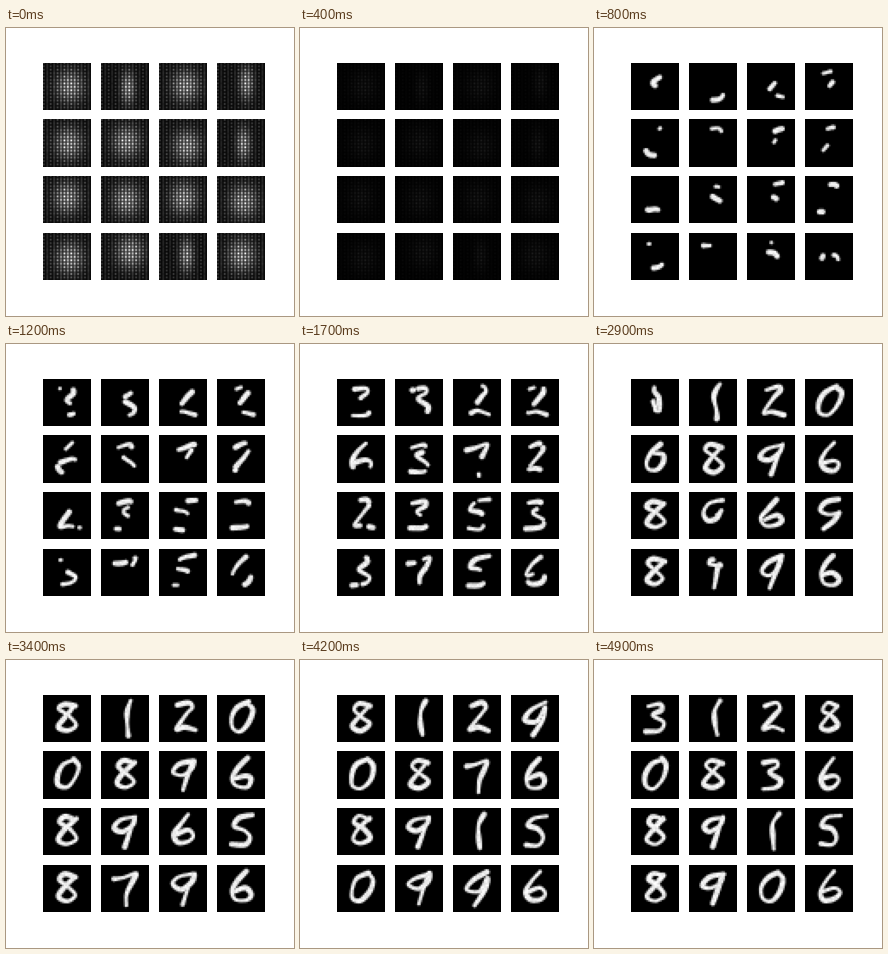
A matplotlib script that plays this animation: 288 px wide and 288 px high, repeating every 5100 ms.

```python
import numpy as np
import matplotlib.pyplot as plt
from matplotlib.animation import FuncAnimation

SIZE, SAMPLES, LAST = 28, 72, 49
Y, X = np.mgrid[:SIZE, :SIZE] + 0.5
TRAIL = np.linspace(0, 1, SAMPLES)

# One pen stroke per digit, as a few points on the 28 x 28 grid
DIGITS = [
    [(18, 5), (12, 8), (8.5, 14), (9, 20), (14, 21.5), (19, 16), (21, 9), (18, 5)],
    [(18, 4), (15, 10), (15, 17), (16, 24)],
    [(11, 6.5), (17, 5), (19, 8), (16, 12), (10, 20), (15, 19.5), (21, 21)],
    [(10, 7), (17, 6), (18, 9), (13, 12.5), (19, 17), (17, 21), (9, 22)],
    [(20, 4.5), (12, 9), (8, 15), (15, 16), (20, 8), (18, 15), (13, 24)],
    [(21, 5), (13, 6.5), (10, 11), (16, 13), (19, 18), (16, 22), (9, 22)],
    [(17, 4.5), (12, 10), (9, 16), (11, 21), (17, 21), (20, 17), (17, 14), (10, 16)],
    [(8, 9), (13, 8), (20, 5.5), (18, 11), (15, 17), (15, 24)],
    [(19, 7), (13, 5.5), (10, 9), (15, 13), (19, 18), (14, 21.5), (9, 19), (13, 13), (19, 7)],
    [(20, 6), (12, 7.5), (8, 12), (13, 14), (19, 10), (20, 6), (17, 14), (14, 23)],
]

# Digits the sixteen cells resemble, by frame
STAGES = {
    0: "3322637223533756",
    17: "3322637223533756",
    24: "3120689680698946",
    34: "8120089689658796",
    42: "8124087689150946",
    49: "3128083689158906",
}
KEYS = list(STAGES)
NARROW_GLOW = {1, 3, 7, 14}


def smoothstep(t):
    t = np.clip(t, 0, 1)
    return t * t * (3 - 2 * t)


def curve(points):
    """Catmull-Rom curve through the points, evenly sampled."""
    p = np.vstack([points[0], points, points[-1]])
    place = TRAIL * (len(points) - 1)
    i = np.minimum(place.astype(int), len(points) - 2)
    u = (place - i)[:, None]
    a, b, c, d = p[i], p[i + 1], p[i + 2], p[i + 3]
    return b + u * (c - a + u * (2 * a - 5 * b + 4 * c - d + u * (3 * (b - c) + d - a))) / 2


def handwriting(cell, key):
    """The cell's digit at a key frame, a little different each time."""
    rng = np.random.default_rng(100 * key + cell)
    points = np.array(DIGITS[int(STAGES[key][cell])], float)
    return curve(points + rng.normal(0, 0.3, points.shape))


def pen_path(cell, frame, rng):
    after = next(k for k in KEYS[1:] if k >= frame)
    before = KEYS[KEYS.index(after) - 1]
    t = (frame - before) / (after - before)
    path = handwriting(cell, before)
    path = path + smoothstep(t) * (handwriting(cell, after) - path)
    phase = rng.uniform(0, 2 * np.pi, 2)
    sway = np.sin(2 * np.pi * TRAIL[:, None] + phase)
    return path + 0.6 * np.sin(np.pi * t) * sway


def strongest(path, cell, frame):
    """The part of a stroke already formed; level runs come first."""
    phase = np.random.default_rng(cell).uniform(0, 2 * np.pi, 3)
    noise = sum(np.sin((4 + 5 * n) * TRAIL + phase[n] + 0.2 * frame) for n in range(3))
    slope = np.gradient(path, axis=0)
    level = np.abs(slope[:, 0]) / (np.hypot(*slope.T) + 1e-6)
    order = np.argsort(np.argsort(-(noise + 1.5 * level)))
    return order < SAMPLES * np.clip((frame - 5) / 17, 0, 1)


def digit_image(cell, frame):
    rng = np.random.default_rng(1000 * frame + cell)
    path = pen_path(cell, frame, rng)
    width = 1.85 + 0.3 * np.sin(9 * TRAIL + rng.uniform(0, 6))
    distance = np.hypot(X - path[:, 0, None, None], Y - path[:, 1, None, None])
    mark = np.clip(width[:, None, None] - distance, 0, 1)
    mark *= strongest(path, cell, frame)[:, None, None]
    return mark.max(axis=0) * rng.uniform(0.88, 1, X.shape)


def woven_image(cell):
    """Fine woven dots brightened around a soft centre."""
    rng = np.random.default_rng(cell)
    cx, cy = rng.normal((15.5, 14.5), 0.8)
    spread = 2.8 if cell in NARROW_GLOW else 5.5
    col, row = X.astype(int), Y.astype(int)
    dots = (0.55 + 0.45 * (-1.0) ** col) * (0.6 + 0.4 * (-1.0) ** row)
    dots *= 0.85 + 0.15 * np.cos(np.pi * (col + row) / 2)
    glow = np.exp(-((X - cx) / spread) ** 2 / 2 - ((Y - cy) / 6.5) ** 2 / 2)
    slant = 0.1 * ((col + 2 * row) % 4 == 0)
    return np.clip(0.03 + slant + 0.12 * dots + glow * (0.2 + 0.65 * dots), 0, 1)


def cell_image(cell, frame):
    fade = np.clip(1 - frame / 6, 0, 1) ** 2
    return np.maximum(fade * woven_image(cell), digit_image(cell, frame))


fig, axes = plt.subplots(4, 4, figsize=(4, 4), dpi=72)
fig.subplots_adjust(left=0.125, right=0.9, bottom=0.125, top=0.88, wspace=0.2, hspace=0.2)
tiles = []
for ax in axes.flat:
    ax.axis("off")
    tiles.append(ax.imshow(np.zeros((SIZE, SIZE)), cmap="gray", vmin=0, vmax=1))


def update(frame):
    for cell, tile in enumerate(tiles):
        tile.set_data(cell_image(cell, min(frame, LAST)))
    return tiles


anim = FuncAnimation(fig, update, frames=LAST + 2, interval=100, repeat=True, repeat_delay=0)
plt.show()
```
